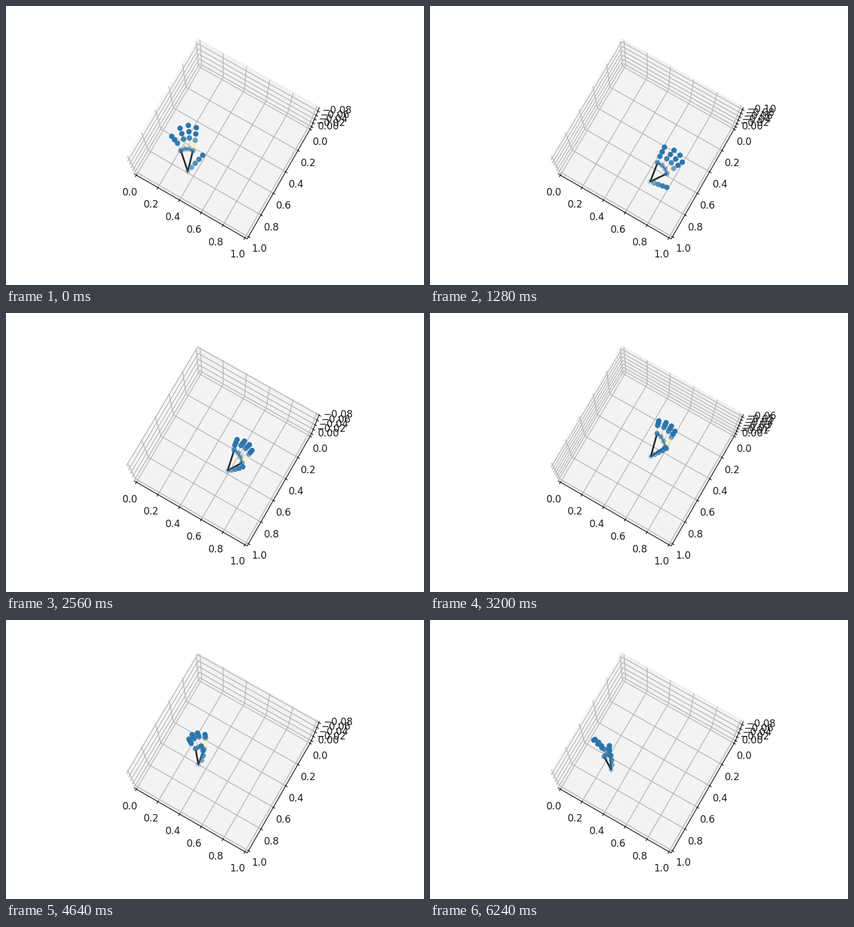
A matplotlib script for the animation above (6400 ms loop, 729x486 px).

```python
import numpy as np
import matplotlib.pyplot as plt
from matplotlib.animation import FuncAnimation
from matplotlib.collections import LineCollection

WIDTH, HEIGHT, DPI = 729, 486, 121.5
FRAMES, INTERVAL = 40, 160
BLUE, GRID, INK = "#2a75ad", "#b8b8b8", "#1c1c1c"

# Camera: a 4:4:3 box seen from below its far side
ELEV, AZIM, DIST = np.radians(-100), np.radians(-120), 10
BOX = np.array([4, 4, 3]) * 1.8294640721620434 / np.sqrt(41)
SCALE = 0.755 * HEIGHT / 0.185
CENTER = (378.6, 236.8)
TOWARD = np.array([np.cos(ELEV) * np.cos(AZIM),
                   np.cos(ELEV) * np.sin(AZIM),
                   np.sin(ELEV)])
RIGHT = np.cross([0, 0, -1], TOWARD)
RIGHT /= np.linalg.norm(RIGHT)
UP = np.cross(TOWARD, RIGHT)

LO, HI = -1 / 48, 49 / 48          # padded ends of each axis
LABEL_GAP = 0.1058
LABEL_SHIFT = (-0.8, -0.9)
TICK_IN, TICK_OUT = 0.1 / 12, 0.2 / 12

# Hand poses as screen points x + yj, one entry per key frame
KEYS = [0, 8, 12, 20, 25, 33, 39]
DEPTH = [0.096, 0.110, 0.097, 0.067, 0.079, 0.088, 0.093]
THUMB_BEND = [0, 0, 0.08, 0, 0.29, 0.07, 0.07]
TRACKS = {
    "wrist": [317+288j, 384+306j, 388+299j, 385+250j, 355+240j, 316+263j, 316+261j],
    "thumb": [343+260j, 413+316j, 414+300j, 412+236j, 364+211j, 317+228j, 313+228j],
    "pinky_base": [305+252j, 397+273j, 400+267j, 396+210j, 361+207j, 300+241j, 304+238j],
    "index_base": [326+252j, 413+292j, 413+289j, 410+233j, 372+212j, 319+238j, 314+236j],
    "pinky_mid": [299+239j, 401+262j, 401+265j, 397+196j, 354+198j, 292+232j, 299+220j],
    "middle_mid": [320+230j, 421+273j, 420+266j, 416+206j, 368+187j, 305+220j, 304+225j],
    "index_mid": [330+234j, 425+283j, 426+276j, 421+216j, 381+190j, 315+221j, 312+227j],
    "pinky_tip": [289+227j, 409+246j, 407+253j, 399+188j, 357+194j, 281+221j, 288+208j],
    "middle_tip": [318+208j, 436+260j, 428+262j, 421+197j, 371+190j, 297+204j, 294+213j],
    "index_tip": [332+212j, 440+272j, 431+273j, 427+206j, 384+193j, 310+206j, 313+219j],
}


def project(x, y, z):
    """Map box fractions to stage pixels; z = 1 is the far floor."""
    p = (np.array([x, y, z]) - 0.5) * BOX
    zoom = SCALE / (DIST - p @ TOWARD)
    return CENTER[0] + zoom * (p @ RIGHT), CENTER[1] - zoom * (p @ UP)


def path(*points):
    return [project(*p) for p in points]


def tween(values, frame):
    return np.interp(frame, KEYS, values)


def row(pinky, middle, index):
    """Four knuckles on one curve, the ring finger placed between."""
    return np.array([pinky, middle + (pinky - index) / 3, middle, index])


def hand(frame):
    p = {name: tween(track, frame) for name, track in TRACKS.items()}
    wrist = p["wrist"]
    middle = p["pinky_base"] + 2 / 3 * (p["index_base"] - p["pinky_base"])
    middle += 3 * (middle - wrist) / abs(middle - wrist)
    base = row(p["pinky_base"], middle, p["index_base"])
    mid = row(p["pinky_mid"], p["middle_mid"], p["index_mid"])
    tip = row(p["pinky_tip"], p["middle_tip"], p["index_tip"])
    t = np.array([0.25, 0.5, 0.75, 1])
    reach = p["thumb"] - wrist
    thumb = wrist + reach * (t + 4j * t * (1 - t) * tween(THUMB_BEND, frame))
    return wrist, thumb, base, mid, tip


def xy(points):
    points = np.asarray(points)
    return np.column_stack([points.real, points.imag])


fig = plt.figure(figsize=(WIDTH / DPI, HEIGHT / DPI), dpi=DPI, facecolor="white")
ax = fig.add_axes([0, 0, 1, 1])
ax.set_xlim(0, WIDTH)
ax.set_ylim(HEIGHT, 0)
ax.axis("off")


def add_lines(segments, color, width, order):
    lines = LineCollection(segments, colors=color, linewidths=width, zorder=order)
    ax.add_collection(lines, autolim=False)
    return lines


def label_spot(x, y, z):
    return np.add(project(x, y, z), LABEL_SHIFT)


def add_label(text="", pos=(0, 0)):
    return ax.text(*pos, text, fontsize=10, family="DejaVu Sans", color=INK,
                   ha="center", va="top", zorder=4)


def draw_box():
    panes = [
        ("0.95", [(LO, LO, LO), (LO, HI, LO), (LO, HI, HI), (LO, LO, HI)]),
        ("0.90", [(LO, LO, LO), (HI, LO, LO), (HI, LO, HI), (LO, LO, HI)]),
        ("0.91", [(LO, LO, HI), (HI, LO, HI), (HI, HI, HI), (LO, HI, HI)]),
    ]
    for shade, corners in panes:
        ax.add_patch(plt.Polygon(path(*corners), facecolor=shade, edgecolor=shade,
                                 alpha=0.5, linewidth=1, zorder=1))

    grid, ticks = [], []
    far = HI + LABEL_GAP
    for v in np.arange(6) / 5:
        grid.append(path((v, LO, LO), (v, LO, HI), (v, HI, HI)))
        grid.append(path((LO, v, LO), (LO, v, HI), (HI, v, HI)))
        ticks.append(path((v, HI - TICK_IN, HI), (v, HI + TICK_OUT, HI)))
        ticks.append(path((HI - TICK_IN, v, HI), (HI + TICK_OUT, v, HI)))
        add_label(f"{v:.1f}", label_spot(v, far, far))
        add_label(f"{v:.1f}", label_spot(far, v, far))
    edges = [path((LO, HI, HI), (HI, HI, HI)),
             path((HI, LO, HI), (HI, HI, HI)),
             path((HI, LO, LO), (HI, LO, HI))]
    add_lines(grid, GRID, 0.9, 2)
    add_lines(edges + ticks, INK, 0.8, 3)


draw_box()
z_grid = add_lines([], GRID, 0.9, 2)
z_ticks = add_lines([], INK, 0.8, 3)
z_labels = [add_label() for _ in range(8)]

light_bones = add_lines([], "#d9d4c6", 1.2, 5)
index_bone = add_lines([], "#f8f0c6", 4, 5)
knuckles = add_lines([], "#85827e", 1.7, 6)
palm = add_lines([], "#2a2a28", 1.8, 7)

# Joints nearer to the viewer are more opaque
ALPHAS = np.concatenate([[0.3], [0.65, 0.8, 0.9, 0.95],
                         [0.8, 0.55, 0.5, 0.65], [0.95, 0.9, 0.85, 0.65],
                         np.ones(8)])
dots = ax.scatter(np.zeros(21), np.zeros(21), s=31, color=BLUE, alpha=ALPHAS,
                  linewidths=0, zorder=8)


def draw_z_axis(depth):
    step = 0.01 if depth <= 0.07 else 0.02
    levels = np.arange(0, depth, step)
    grid, ticks = [], []
    for label in z_labels:
        label.set_text("")
    for level, label in zip(levels, z_labels):
        z = 1 - level / depth
        grid.append(path((LO, HI, z), (LO, LO, z), (HI, LO, z)))
        ticks.append(path((HI - TICK_IN, LO, z), (HI + TICK_OUT, LO, z)))
        sign = "\u2212" if level else ""
        label.set_text(f"{sign}{level:.2f}")
        label.set_position(label_spot(HI + LABEL_GAP, LO - LABEL_GAP, z))
    z_grid.set_segments(grid)
    z_ticks.set_segments(ticks)


def draw_hand(frame):
    wrist, thumb, base, mid, tip = hand(frame)
    bones = [xy(pair) for pair in zip(base, mid)]
    light_bones.set_segments(bones[:3])
    index_bone.set_segments(bones[3:])
    knuckles.set_segments([xy(base)])
    palm.set_segments([xy([base[0], wrist, base[3]])])
    joints = np.concatenate([[wrist], thumb, base, mid, (mid + tip) / 2, tip])
    dots.set_offsets(xy(joints))


def update(frame):
    draw_z_axis(tween(DEPTH, frame))
    draw_hand(frame)
    return []


anim = FuncAnimation(fig, update, frames=FRAMES, interval=INTERVAL,
                     init_func=lambda: update(0), repeat=True, blit=False)
plt.show()
```
